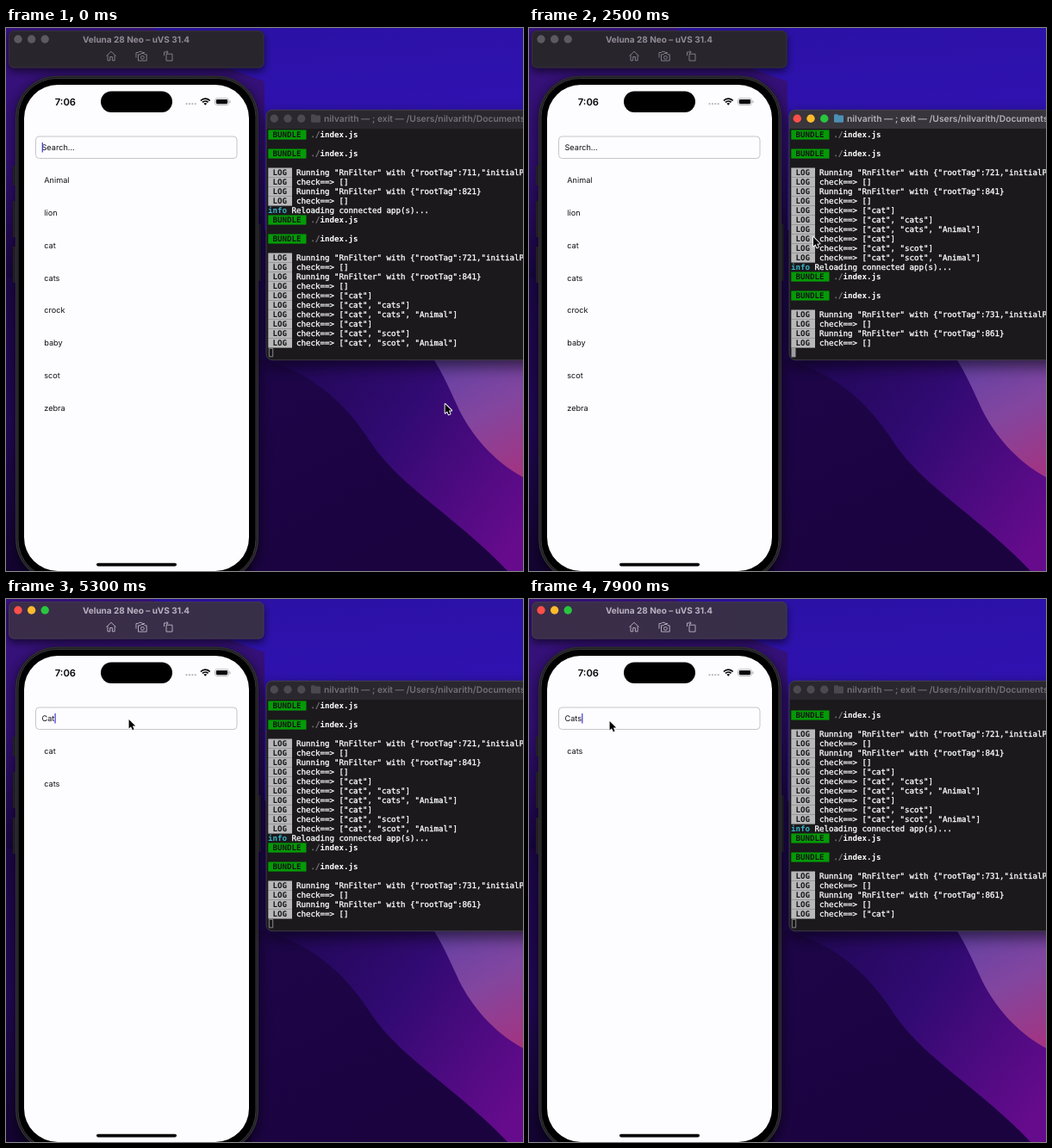
These frames come from a looping animation (600 by 631 pixels, 8 s). An HTML page with a canvas:

```html
<!DOCTYPE html>
<html lang="en">
<head>
<meta charset="utf-8">
<title>List filter demo</title>
<style>
  html, body { margin: 0; width: 100%; height: 100%; overflow: hidden; background: #1a0540; }
  canvas { display: block; width: 600px; height: 631px; }
</style>
</head>
<body>
<canvas id="stage"></canvas>
<script>
const W = 600, H = 631, LOOP = 8000;
const canvas = document.getElementById('stage');
const dpr = window.devicePixelRatio || 1;
canvas.width = W * dpr;
canvas.height = H * dpr;
const ctx = canvas.getContext('2d');
const SANS = 'Inter, Roboto, sans-serif';
const MONO = '"DejaVu Sans Mono", "Liberation Mono", monospace';
const ANIMALS = ['Animal', 'lion', 'cat', 'cats', 'crock', 'baby', 'scot', 'zebra'];

// Times of the user's actions, in ms
const T = {
  termOn: 900, reload: 1500, built: 1900, running: 2000, termOff: 3000,
  phoneOn: 3700, c: 4400, a: 4600, t: 4900, pick: 6100, refocus: 7100, s: 7600
};
const PATH = [
  [0, 509, 436.5], [200, 509, 436.5], [800, 452, 310], [2200, 452, 310],
  [2900, 142, 139.5], [5400, 142, 139.5], [5950, 45, 177.3],
  [6400, 45, 177.3], [7000, 93, 141.5], [8000, 93, 141.5]
];

// ---- drawing helpers ----
function fillBox(x, y, w, h, r, fill) {
  ctx.beginPath();
  ctx.roundRect(x, y, w, h, r);
  ctx.fillStyle = fill;
  ctx.fill();
}
function strokeBox(x, y, w, h, r, color, line = 1) {
  ctx.beginPath();
  ctx.roundRect(x, y, w, h, r);
  ctx.strokeStyle = color;
  ctx.lineWidth = line;
  ctx.stroke();
}
function dot(x, y, r, color) {
  ctx.beginPath();
  ctx.arc(x, y, r, 0, 7);
  ctx.fillStyle = color;
  ctx.fill();
}
function text(s, x, y, font, color, align = 'left') {
  ctx.font = font;
  ctx.fillStyle = color;
  ctx.textAlign = align;
  ctx.fillText(s, x, y);
}
function grad(x0, y0, x1, y1, ...colors) {
  const g = ctx.createLinearGradient(x0, y0, x1, y1);
  colors.forEach((c, i) => g.addColorStop(i / (colors.length - 1), c));
  return g;
}
function shape(d, fill) {
  ctx.fillStyle = fill;
  ctx.fill(new Path2D(d));
}
function line(d, color, w = 1) {
  ctx.strokeStyle = color;
  ctx.lineWidth = w;
  ctx.stroke(new Path2D(d));
}
function lights(x, y, gap, on, off) {
  const colors = on ? ['#fe4f49', '#fdbb2c', '#28c63f'] : [off, off, off];
  colors.forEach((c, i) => dot(x + i * gap, y, 4.7, c));
}
function shadow(color, blur, y) {
  ctx.shadowColor = color;
  ctx.shadowBlur = blur * dpr;
  ctx.shadowOffsetY = y * dpr;
}

// ---- scene parts ----
function wallpaper() {
  ctx.fillStyle = grad(300, 0, 330, 390, '#2c11a6', '#3213b8', '#230e8c');
  ctx.fillRect(0, 0, W, H);
  shape('M0 0H170C205 25 250 45 300 62V300H0Z', grad(0, 0, 20, 300, '#38127f', '#320f74', '#150439'));
  shape('M0 290H300V631H0Z', grad(0, 290, 0, 631, '#1c0648', '#210854', '#120330'));
  shape('M285 218C350 290 440 340 497 386C530 440 560 500 600 521V631H285Z',
    grad(300, 360, 600, 580, '#1d0750', '#310a72', '#650b8c'));
  shape('M285 382C350 396 392 432 425 484C460 535 525 570 582 631H285Z',
    grad(310, 400, 420, 631, '#1d0548', '#1b0340'));
  shape('M497 386H600V522C565 503 540 472 526 444C516 422 507 402 497 386Z',
    grad(515, 380, 590, 520, '#6441a5', '#83469f', '#a23482'));
}

function phoneBar(on) {
  shadow('rgba(0,0,0,.6)', 10, 4);
  fillBox(3, 3, 296.5, 43.5, 6, on ? grad(3, 0, 300, 0, '#3b2d49', '#372f48') : '#29252d');
  shadow('transparent', 0, 0);
  strokeBox(3.5, 3.5, 295.5, 42.5, 6, on ? '#473d53' : '#3a353f', .7);
  lights(14, 13, 15.6, on, '#5d5961');
  text('Veluna 28 Neo – uVS 31.4', 151, 16.7, '700 10px ' + SANS, on ? '#bab2c1' : '#918b96', 'center');
  const c = on ? '#b1a9b9' : '#817b87';
  line('M116.5 32.5L122 27.3L127.5 32.5M118 31.5V37.8H120.7V33.5H123.4V37.8H126.1V31.5', c);
  line('M151 34.5V28.5H153.5L154.3 27.4H157.5L158.3 28.5H161M153.5 30.8H156L157 29.5H160L161 30.8H163.2V38H153.5Z', c);
  ctx.beginPath();
  ctx.arc(158.4, 34.3, 1.9, 0, 7);
  ctx.stroke();
  line('M186 30.2H193V38H186ZM183.5 32V28H188M186.4 26.2L188.2 28L186.4 29.8', c);
}

function phoneBody() {
  [[160, 23], [201, 42], [254, 42]].forEach(([y, h]) => fillBox(8, y, 5, h, 1, '#2b282e'));
  fillBox(291, 228, 4.5, 66, 1, '#2b282e');
  shadow('rgba(0,0,0,.6)', 16, 4);
  fillBox(11, 55.5, 282, 587, 48, '#1d1c1f');
  shadow('transparent', 0, 0);
  strokeBox(11.7, 56.2, 280.6, 585.6, 47.5, '#38363b', 1);
  fillBox(14, 58.5, 276, 581, 45, '#000');
  strokeBox(14, 58.5, 276, 581, 45, '#454348', .8);
  fillBox(21, 66, 261, 565, 39, '#fdfcfe');
  fillBox(110, 73.5, 83, 24.5, 12.2, '#000');
  text('7:06', 56.8, 89.7, '600 11.2px ' + SANS, '#050505');
  for (let i = 0; i < 4; i++) dot(209.5 + i * 3.4, 88.2, 1.1, '#b9b8bc');
  // wifi
  ctx.lineWidth = 1.7;
  ctx.strokeStyle = '#050505';
  [7.3, 4.5].forEach(r => {
    ctx.beginPath();
    ctx.arc(231.3, 89.5, r, -Math.PI * .76, -Math.PI * .24);
    ctx.stroke();
  });
  shape('M231.3 89.8L229.4 87.8Q231.3 86.3 233.2 87.8Z', '#050505');
  // battery
  strokeBox(242.5, 81.7, 16, 7.8, 2.5, '#aaa8ad', .8);
  fillBox(243.8, 83, 13.4, 5.2, 1.4, '#050505');
  fillBox(259.5, 84.2, 1, 2.8, .5, '#aaa8ad');
  fillBox(105, 621.8, 93, 3.6, 1.8, '#050505');
}

function appState(t) {
  let value = '';
  if (t >= T.c) value = 'C';
  if (t >= T.a) value = 'Ca';
  if (t >= T.t) value = 'Cat';
  if (t >= T.s) value = 'Cats';
  const key = value.toLowerCase();
  let list = ANIMALS.filter(n => n.toLowerCase().includes(key));
  if (t >= T.pick && t < T.s) list = [];
  const focused = t < T.reload || (t >= T.phoneOn && t < T.pick) || t >= T.refocus;
  const since = [T.s, T.refocus, T.t, T.a, T.c, T.phoneOn, 0].find(k => k <= t);
  return { value, list, caret: focused && (t - since) % 1000 < 500 };
}

function app(t) {
  const { value, list, caret } = appState(t);
  const font = '400 9.15px ' + SANS;
  strokeBox(34.5, 126, 233.5, 25.5, 4, '#c6c5c9');
  text(value || 'Search...', 41.5, 142.1, font, '#101012');
  if (caret) {
    const x = 41.7 + (value ? ctx.measureText(value).width : 0);
    ctx.fillStyle = '#3c35dc';
    ctx.fillRect(x, 133, 1.2, 11.5);
  }
  list.forEach((n, i) => text(n, 44.3, 180.3 + i * 37.75, font, '#101012'));
}

// ---- terminal ----
const CELL = 5.5, ROW = 11, LEFT = 304, TOP = 118.5;
const log = s => ({ kind: 'log', s });
const check = (...names) => log('check==> [' + names.map(n => `"${n}"`).join(', ') + ']');
const run = tag => log('Running "RnFilter" with {"rootTag":' + tag);
const boot = (a, b) => [run(a + ',"initialProps":{}}'), check(), run(b + '}'), check()];
const BLANK = { kind: 'blank' }, BUNDLE = { kind: 'bundle' }, INFO = { kind: 'info' };
const LOADING = { kind: 'bundle', loading: true };
const HISTORY = [
  BUNDLE, BLANK, BUNDLE, BLANK, ...boot(711, 821), INFO,
  BUNDLE, BLANK, BUNDLE, BLANK, ...boot(721, 841),
  check('cat'), check('cat', 'cats'), check('cat', 'cats', 'Animal'),
  check('cat'), check('cat', 'scot'), check('cat', 'scot', 'Animal')
];

function terminalRows(t) {
  const rows = [...HISTORY];
  if (t >= T.reload) rows.push(INFO, BUNDLE, BLANK, t < T.built ? LOADING : BUNDLE);
  if (t >= T.built) rows.push(BLANK);
  if (t >= T.running) rows.push(...boot(731, 861));
  if (t >= T.pick) rows.push(check('cat'));
  return rows;
}

// Regular glyphs get a hairline outline for a medium weight
function cells(s, col, y, color, bold) {
  ctx.font = (bold ? '700 ' : '400 ') + '9.14px ' + MONO;
  ctx.fillStyle = ctx.strokeStyle = color;
  ctx.lineWidth = .3;
  ctx.textAlign = 'left';
  for (let i = 0; i < s.length; i++) {
    const x = LEFT + (col + i) * CELL;
    ctx.fillText(s[i], x, y + 8.7);
    if (!bold) ctx.strokeText(s[i], x, y + 8.7);
  }
}
function badge(s, y, bg) {
  ctx.fillStyle = bg;
  ctx.fillRect(LEFT + .3, y, (s.length + 2) * CELL + .2, ROW + .1);
  cells(s, 1, y, '#151515', true);
}
function drawRow(row, y) {
  if (row.kind === 'log') {
    badge('LOG', y, '#b8b7b9');
    cells(row.s, 6, y, '#fff');
  } else if (row.kind === 'info') {
    cells('info', 0, y, '#35b2c5', true);
    cells('Reloading connected app(s)...', 5, y, '#fff');
  } else if (row.kind === 'bundle') {
    badge('BUNDLE', y, row.loading ? '#8c9952' : '#049a06');
    cells('./', 9, y, '#77747a');
    cells('index.js', 11, y, '#fff', true);
    if (row.loading) {
      ctx.fillStyle = '#b8b7b9';
      ctx.fillRect(LEFT + 20 * CELL, y, 16 * CELL, ROW);
      cells('0.0%', 37, y, '#fff', true);
      cells('(0/1)', 42, y, '#77747a');
    }
  }
}

function terminal(t) {
  const on = t >= T.termOn && t < T.termOff;
  shadow('rgba(0,0,0,.6)', 18, 7);
  fillBox(302, 95, 320, 291, 7, '#1b191c');
  shadow('transparent', 0, 0);
  fillBox(302, 95, 320, 22, [7, 7, 0, 0], on ? '#39353c' : '#2b272e');
  strokeBox(302, 95.3, 320, 290.5, 7, '#4b4751', .8);
  lights(311.3, 105.2, 15.7, on, '#4d4951');
  shape('M354 101.5Q354 100.3 355.2 100.3H358L359.2 101.6H364Q365 101.6 365 102.7V108.8Q365 109.8 364 109.8H355Q354 109.8 354 108.8Z',
    on ? '#4c8fb5' : '#4c4851');
  text('nilvarith — ; exit — /Users/nilvarith/Documents/projects', 369, 108.9,
    '600 10.3px ' + SANS, on ? '#b6b2b9' : '#737077');

  const rows = terminalRows(t);
  const loading = rows[rows.length - 1].loading;
  const first = rows.length + (loading ? 0 : 1) - 24;
  for (let i = 0; i < 24; i++) {
    const row = rows[first + i];
    if (row) drawRow(row, TOP + i * ROW);
  }
  const cy = TOP + 23 * ROW;
  const cx = LEFT + (loading ? 47 * CELL : 0);
  if (on) {
    ctx.fillStyle = '#a09da2';
    ctx.fillRect(cx + .5, cy, 5, ROW);
  } else {
    strokeBox(cx + 1.3, cy + .8, 4.4, 9.6, 0, '#96939a', .9);
  }
}

function pointer(t) {
  if (t >= T.reload && t < 2200) return;
  const i = Math.max(1, PATH.findIndex(p => p[0] > t));
  const [t0, x0, y0] = PATH[i - 1], [t1, x1, y1] = PATH[i];
  const u = (t - t0) / (t1 - t0), e = u * u * (3 - 2 * u);
  ctx.save();
  ctx.translate(x0 + (x1 - x0) * e, y0 + (y1 - y0) * e);
  const arrow = new Path2D('M.6 .4V11L3 8.8L4.8 12.8L6.6 12L4.9 8.1L8.2 8Z');
  ctx.lineJoin = 'round';
  ctx.lineWidth = 1.8;
  ctx.strokeStyle = '#fff';
  ctx.stroke(arrow);
  ctx.fillStyle = '#000';
  ctx.fill(arrow);
  ctx.restore();
}

function draw(now) {
  const t = now % LOOP;
  ctx.setTransform(dpr, 0, 0, dpr, 0, 0);
  ctx.textRendering = 'geometricPrecision';
  wallpaper();
  phoneBody();
  phoneBar(t >= T.phoneOn);
  app(t);
  terminal(t);
  pointer(t);
}

const start = performance.now();
function tick() {
  draw(performance.now() - start);
  requestAnimationFrame(tick);
}
tick();
</script>
</body>
</html>
```
